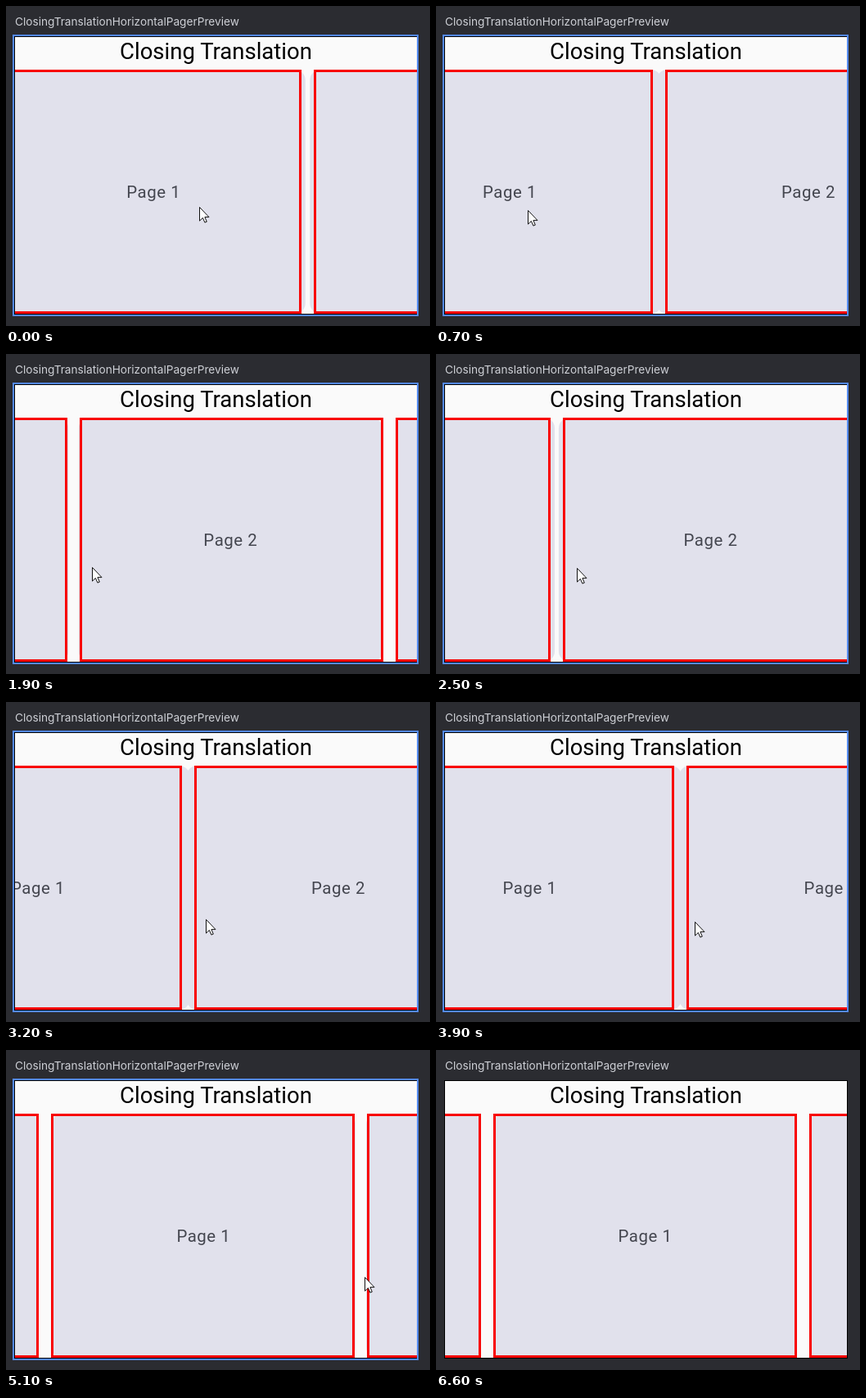
These frames come from a looping animation (518 px wide and 392 px high, 6700 ms). An HTML page:

```html
<!DOCTYPE html>
<html lang="en">
<head>
<meta charset="utf-8">
<title>Closing translation pager</title>
<style>
  html, body { margin: 0; width: 100%; height: 100%; overflow: hidden; background: #2b2c31; }
  svg { display: block; width: 518px; height: 392px; }
  .tab { font: 13.65px Inter, sans-serif; fill: #ced0d6; }
  .title { font: 27.5px Roboto, sans-serif; text-anchor: middle; }
  .label { font: 20.4px Roboto, sans-serif; letter-spacing: .55px; text-anchor: middle; fill: #44464f; }
  .card { fill: #e1e1ec; }
  .bounds { fill: none; stroke: #f80000; stroke-width: 3; }
</style>
</head>
<body>
<svg viewBox="0 0 518 392">
  <defs><clipPath id="screen"><rect x="10" y="37" width="493" height="341"/></clipPath></defs>
  <rect width="518" height="392" fill="#2b2c31"/>
  <text class="tab" x="11" y="24">ClosingTranslationHorizontalPagerPreview</text>
  <g clip-path="url(#screen)">
    <rect x="10" y="37" width="493" height="341" fill="#fafafa"/>
    <text class="title" x="256.5" y="65">Closing Translation</text>
    <g id="pager"></g>
  </g>
  <rect x="10.5" y="37.5" width="492" height="340" fill="none" stroke="#000"/>
  <rect id="focus" x="9" y="36" width="494" height="343" fill="none" stroke="#548af0" stroke-width="2"/>
  <path id="cursor" d="M.5 .5V17.2L4.4 13.5L6.9 19.2L9.3 18.2L6.9 12.6H12Z" fill="#fff" stroke="#111" stroke-width="1"/>
</svg>
<script>
const LOOP = 6700, STEP = 100;
const PAGE = { x: 70, y: 78, width: 371, height: 299, pitch: 386 };
const CLOSE = 23;
const RELEASE = 1600, CATCH = 1900, DROP = 5100, LEAVE = 5400;

// Rows are [time, value...]
const drag = [[0, 80], [400, 140], [700, 176], [1000, 187], [1300, 191], [RELEASE, 191]];
const dragBack = [[CATCH, 366], [2500, 301], [3900, 150], [DROP, 15]];
const pointer = [
  [0, 236, 246], [400, 159, 249], [700, 112, 250], [1300, 98, 255], [RELEASE, 98, 259],
  [CATCH, 105, 261], [2500, 172, 262], [3900, 316, 269], [DROP, 438, 278], [LEAVE, 480, 284]
];

const $ = id => document.getElementById(id);

function add(parent, tag, attrs) {
  const node = document.createElementNS('http://www.w3.org/2000/svg', tag);
  for (const key in attrs) node.setAttribute(key, attrs[key]);
  return parent.appendChild(node);
}

function sample(rows, t, column = 1) {
  const next = rows.findIndex(row => row[0] > t);
  if (next < 0) return rows[rows.length - 1][column];
  const a = rows[Math.max(next - 1, 0)], b = rows[next];
  return a[column] + (b[column] - a[column]) * (t - a[0]) / (b[0] - a[0]);
}

// Critically damped snap
function spring(from, to, ms) {
  const u = ms / 50;
  return to + (from - to) * (1 + u) * Math.exp(-u);
}

function scrollAt(t) {
  if (t < RELEASE) return sample(drag, t);
  if (t < CATCH) return spring(191, 370, t - RELEASE);
  if (t < DROP) return sample(dragBack, t);
  return spring(15, 0, t - DROP);
}

const pages = [0, 1, 2, 3].map(number => {
  const { x, y, width, height } = PAGE;
  const root = add($('pager'), 'g', {});
  const content = add(root, 'g', {});
  add(content, 'rect', { class: 'card', x, y, width, height, rx: 13 });
  add(content, 'text', { class: 'label', x: x + width / 2, y: 235 }).textContent = 'Page ' + number;
  add(root, 'rect', { class: 'bounds', x: x + 1.5, y: y + 1.5, width: width - 3, height: height - 3 });
  return { number, root, content };
});

function draw(t) {
  const scroll = Math.round(scrollAt(t));
  for (const { number, root, content } of pages) {
    const left = (number - 1) * PAGE.pitch - scroll;
    const distance = Math.abs(left / PAGE.pitch);
    const shift = -Math.sign(left) * CLOSE * Math.max(0, Math.min(distance, 1 - distance));
    root.setAttribute('transform', `translate(${left} 0)`);
    content.setAttribute('transform', `translate(${shift} 0)`);
  }
  const visibility = t < LEAVE ? 'visible' : 'hidden';
  $('focus').setAttribute('visibility', visibility);
  $('cursor').setAttribute('visibility', visibility);
  const [x, y] = [1, 2].map(column => Math.round(sample(pointer, t, column)));
  $('cursor').setAttribute('transform', `translate(${x} ${y})`);
}

const start = performance.now();
function tick() {
  const t = (performance.now() - start) % LOOP;
  draw(Math.floor(t / STEP) * STEP);
  requestAnimationFrame(tick);
}
tick();
</script>
</body>
</html>
```
